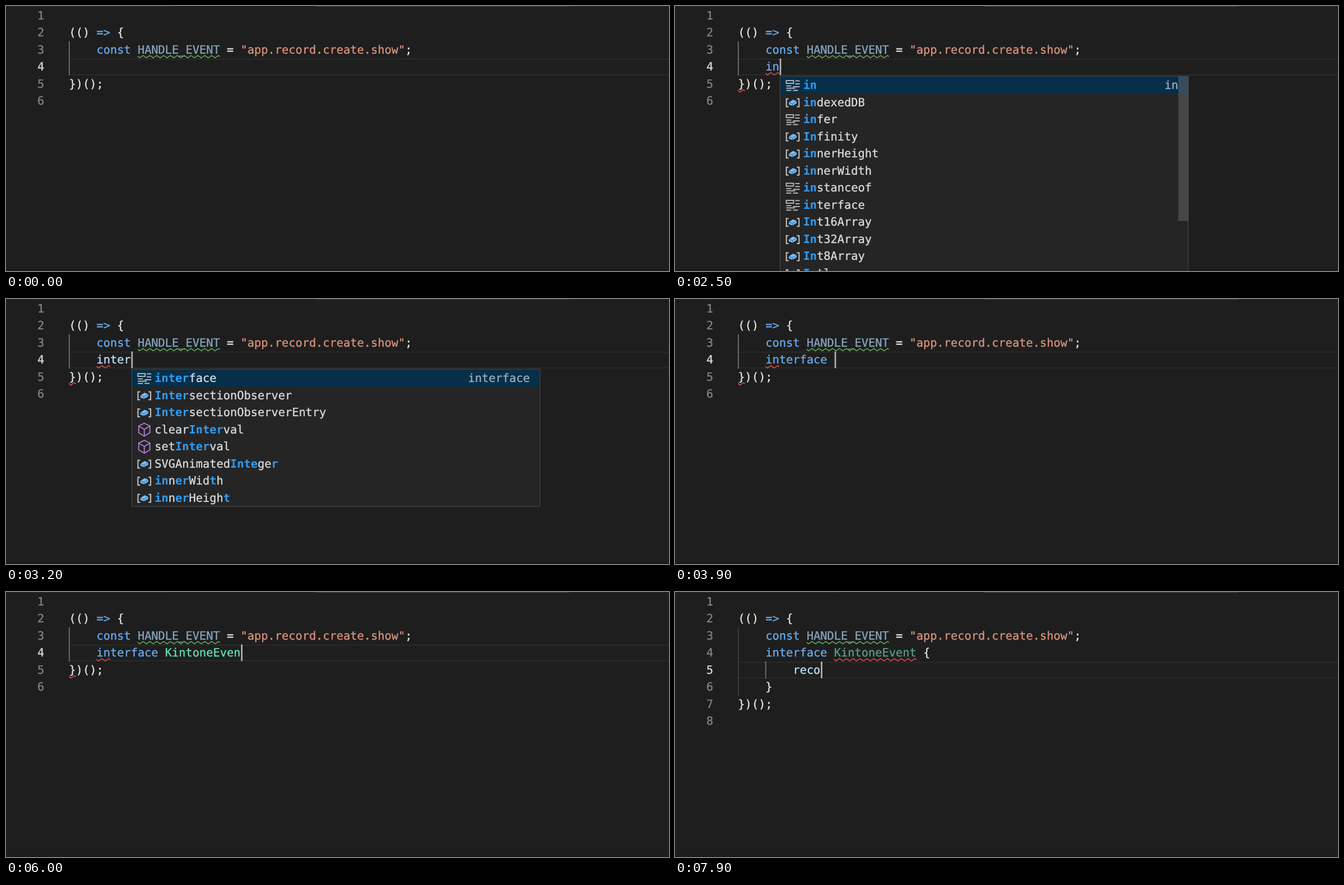
Write an HTML page that moves like this. It is 1183 by 473 pixels and loops after 8000 ms.

```html
<!DOCTYPE html>
<html lang="en">
<head>
<meta charset="utf-8">
<title>Typing an interface</title>
<style>
html, body { margin: 0; width: 100%; height: 100%; overflow: hidden; background: #1e1e1e; }
svg { display: block; width: 1183px; height: 473px; }
text {
  font: 20.33px "DejaVu Sans Mono", monospace; white-space: pre;
  text-rendering: geometricPrecision;
  fill: currentColor; stroke: currentColor; stroke-width: .3px;
}
.hit { font-weight: bold; color: #2f9df4; fill: currentColor; stroke: none; }
</style>
</head>
<body>
<svg id="stage" viewBox="0 0 1183 473"></svg>
<script>
const stage = document.getElementById("stage");
const LOOP = 8000, X0 = 112.5, CW = 12.24, ROW = 30.53;
const PLAIN = "#e8e8e8", BLUE = "#6aaef0", IDENT = "#bfe5fb", RED = "#e5484a";

const colX = c => X0 + c * CW;
const rowY = r => 1.9 + (r - 1) * ROW;
const esc = s => s.replace(/&/g, "&amp;").replace(/</g, "&lt;").replace(/>/g, "&gt;");
const rect = (x, y, w, h, fill) =>
  `<rect x="${x}" y="${y}" width="${w}" height="${h}" fill="${fill}"/>`;
const label = (x, y, color, body) => `<text x="${x}" y="${y}" color="${color}">${body}</text>`;
const code = (r, c, color, s) => label(colX(c), rowY(r) + 21.6, color, esc(s));
const line = (d, color, w = 2) =>
  `<path d="${d}" fill="none" stroke="${color}" stroke-width="${w}"/>`;

function squiggle(r, c, n, color) {
  const x = colX(c), y = rowY(r) + ROW - 0.9;
  let d = `M${x} ${y - 3}`;
  for (let i = 0; i < n; i++) {
    const p = x + i * CW;
    d += `L${p + 3.4} ${y}L${p + 9.5} ${y - 4.2}L${p + CW} ${y - 2.4}`;
  }
  return line(d, color, 1.6);
}

// Suggestions: icon kind, then the label with matched letters between stars
const LISTS = {
  i: ["k*i*f", "k*i*mplements", "k*i*mport", "k*i*n", "v*i*ndexedDB", "k*i*nfer", "v*I*nfinity",
    "v*i*nnerHeight", "v*i*nnerWidth", "k*i*nstanceof", "k*i*nterface", "m*i*sFinite"],
  in: ["k*in*", "v*in*dexedDB", "k*in*fer", "v*In*finity", "v*in*nerHeight", "v*in*nerWidth",
    "k*in*stanceof", "k*in*terface", "v*In*t16Array", "v*In*t32Array", "v*In*t8Array", "v*In*tl"],
  int: ["k*int*erface", "v*Int*16Array", "v*Int*32Array", "v*Int*8Array", "v*Int*ersectionObserver",
    "v*Int*ersectionObserverEntry", "v*Int*l", "k*in*s*t*anceof", "mclear*Int*erval",
    "mset*Int*erval", "vSVGAnimated*Int*eger", "v*in*nerWid*t*h"],
  inte: ["k*inte*rface", "v*Inte*rsectionObserver", "v*Inte*rsectionObserverEntry",
    "vSVGAnimated*Inte*ger", "mclear*Inte*rval", "mset*Inte*rval", "k*in*s*t*anc*e*of",
    "v*in*n*e*rWid*t*h", "v*in*n*e*rHeigh*t*", "m*i*sFi*n*i*te*", "v*i*sSecureCo*nte*xt",
    "vSVGElement*In*s*t*anc*e*"],
  inter: ["k*inter*face", "v*Inter*sectionObserver", "v*Inter*sectionObserverEntry",
    "mclear*Inter*val", "mset*Inter*val", "vSVGAnimated*Inte*ge*r*", "v*in*n*er*Wid*t*h",
    "v*in*n*er*Heigh*t*"],
  re: ["k*re*adonly"]
};

const ICONS = {
  k: line("M1 2H14V7H1ZM17 2.5H25M17 8H25M1 11.5H10M13 13H25M1 15.5H17M1 19.5H10M13 19.5H22", "#c5c5c5", 1.7),
  v: line("M5 4H1.2V18H5M20 4H23.8V18H20", "#c5c5c5") +
    '<path d="M5.5 10.5L13 5.5L19.5 8V12L12 16.5L5.5 14Z" fill="#75beff"/>' +
    line("M5.5 10.5L12 12.8L19.5 8M12 12.8V16.5", "#2c5f8c", 1),
  m: line("M12.5 -1L22.5 4V16L12.5 22L2.5 16V4ZM2.5 4L12.5 10L22.5 4M12.5 10V22", "#b180d7", 1.8)
};

function popup(r, col, word) {
  const items = LISTS[word], x = colX(col) + 1.1, y = rowY(r) + ROW + .6;
  const h = items.length * ROW + 2;
  let s = rect(x, y, 729.5, h, "#454545") + rect(x + 1.3, y + 1.3, 727, h - 2.6, "#252526") +
    rect(x + 1.3, y + 1.3, 727, ROW, "#062f4a");
  items.forEach((item, i) => {
    const top = y + 1 + i * ROW;
    const body = item.slice(1).split("*")
      .map((p, k) => k % 2 ? `<tspan class="hit">${p}</tspan>` : p).join("");
    s += `<g transform="translate(${x + 10.5} ${top + 5.5})">${ICONS[item[0]]}</g>` +
      label(x + 41.6, top + 22.4, "#dedede", body);
  });
  const detail = items[0].slice(1).replace(/\*/g, "");
  s += label(x + 711 - detail.length * CW, y + 23.4, "#a0b0bc", detail);
  if (items.length > 11) s += rect(x + 711, y + 1, 18, 258, "rgba(121,121,121,.4)");
  return s;
}

// [start, text typed so far]
const KEYS = [[0, ""], [1800, "i"], [2100, "in"], [2700, "int"], [2900, "inte"], [3100, "inter"],
  [3300, "interface"], [3700, "interface "]];
"KintoneEvent".split("").forEach((ch, i) =>
  KEYS.push([4250 + i * 165, KEYS[KEYS.length - 1][1] + ch]));
KEYS.push([6300, "interface KintoneEvent "], [6450, "interface KintoneEvent {"]);
const MEMBER = [[0, ""], [7400, "r"], [7600, "re"], [7750, "rec"], [7900, "reco"]];
const at = (list, t) => list.filter(k => k[0] <= t).pop()[1];

// The caret blinks only while nothing is typed
function caretOn(t) {
  if (t < 1800) return (t + 400) % 1000 >= 500;
  return t < 6700 || t >= 7400 || t < 7200;
}

function draw(t) {
  const open = t >= 6700, checked = t >= 6900;
  const cur = open ? 5 : 4, last = open ? 7 : 5;
  const typed = at(KEYS, t), member = at(MEMBER, t);
  const col = open ? 8 + member.length : 4 + typed.length;

  let s = rect(0, 0, 1183, 473, "#1e1e1e") + rect(0, 0, 1183, 1, "#292929") +
    rect(292, 0, 260, 1, "#202020") + rect(552, 0, 453, 1, "#484848") +
    rect(0, 470, 1183, 3, "#1b191b");
  s += rect(113.5, rowY(cur) + .3, 1070, 2.3, "#282828") +
    rect(113.5, rowY(cur) + ROW - 2.3, 1070, 2.3, "#282828");

  s += rect(112, rowY(3), 1.8, ROW * (last - 3), open ? "#404040" : "#707070");
  if (open) s += rect(161, rowY(5), 1.8, ROW, "#707070");

  for (let r = 1; r <= last + 1; r++)
    s += label(56, rowY(r) + 21.6, r === cur ? "#dcdcdc" : "#858585", r);

  s += code(2, 0, PLAIN, "(()") + code(2, 4, BLUE, "=>") + code(2, 7, PLAIN, "{") +
    code(3, 4, BLUE, "const") + code(3, 10, "#86a7c0", "HANDLE_EVENT") +
    code(3, 23, PLAIN, "=") + code(3, 25, "#dd947e", '"app.record.create.show"') +
    code(3, 49, PLAIN, ";") + code(last, 0, PLAIN, "})();");
  s += squiggle(3, 10, 12, "#63b056");

  const keyword = typed === "in" || typed.startsWith("interface");
  s += code(4, 4, keyword ? BLUE : IDENT, typed.slice(0, 9)) +
    code(4, 14, checked ? "#57a189" : "#62e3b8", typed.slice(10, 22)) +
    code(4, 27, PLAIN, typed.slice(23));
  if (t >= 6450 && !open) s += code(4, 28, PLAIN, "}");
  if (open) s += code(6, 4, PLAIN, "}") +
    code(5, 8, member.length > 1 ? IDENT : "#d8d8d8", member);

  if (checked) s += squiggle(4, 14, 12, RED);
  else if (t >= 2500) s += squiggle(4, 4, 2, RED) + squiggle(last, 0, 1, RED);

  if (caretOn(t)) s += rect(colX(col) + .9, rowY(cur) + .2, 2.6, ROW - .8, "#b8b8b0");

  if (t >= 2000 && t < 3300) s += popup(4, col, typed);
  if (member === "re") s += popup(5, col, member);
  return s;
}

let shown = "";
function tick() {
  const s = draw(performance.now() % LOOP);
  if (s !== shown) stage.innerHTML = shown = s;
  requestAnimationFrame(tick);
}
tick();
</script>
</body>
</html>
```
